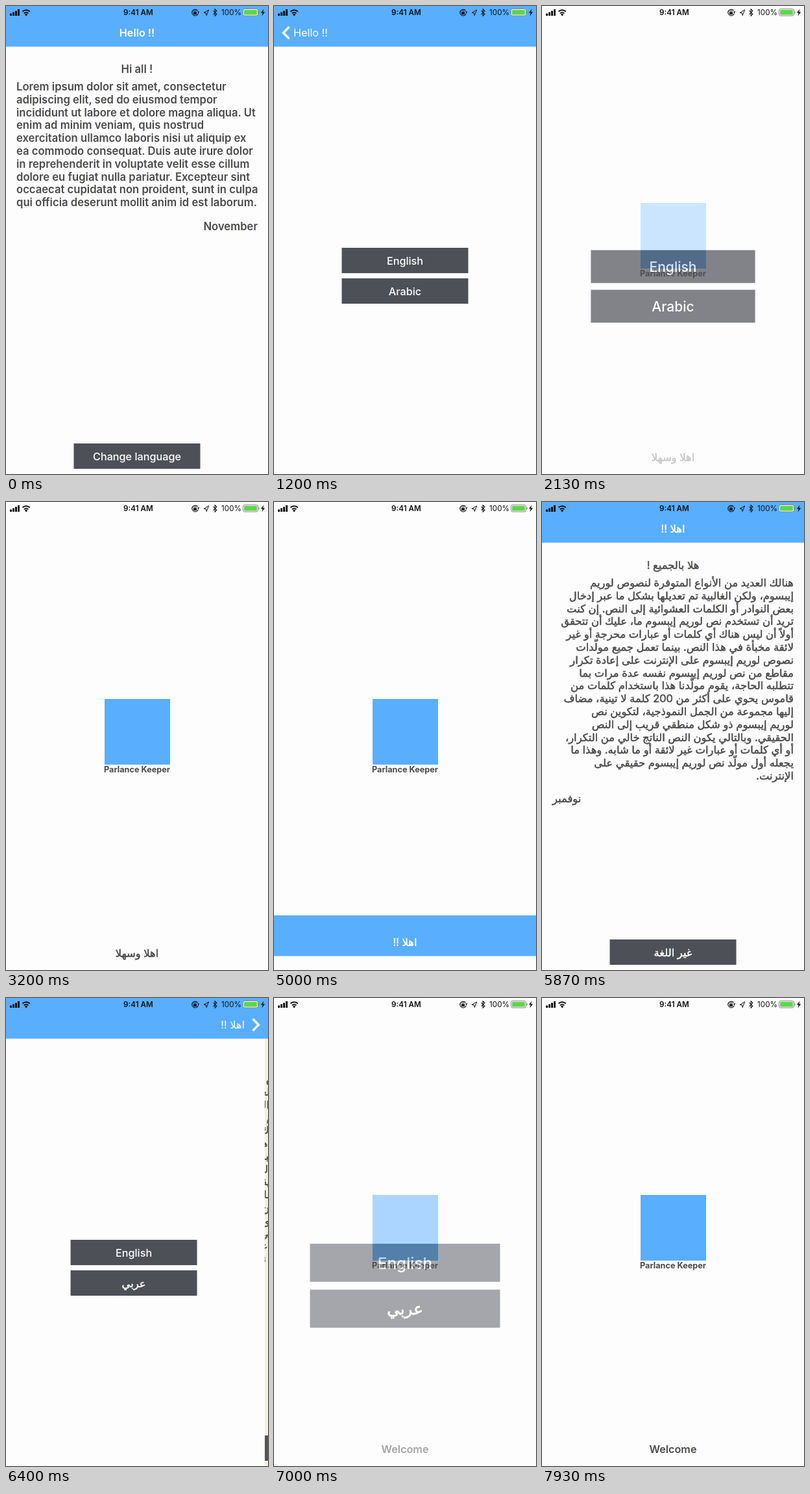
An HTML page for the animation above (8 s loop, 404 px wide and 720 px high).

```html
<!DOCTYPE html>
<html lang="en">
<head>
<meta charset="utf-8">
<title>Language switch</title>
<style>
  html, body { margin: 0; width: 100%; height: 100%; overflow: hidden; background: #fdfdfe; }
  svg { display: block; width: 100vw; height: 100vh; }
  text { font-family: Inter, "DejaVu Sans", sans-serif; font-size: 16.2px; font-weight: 600; fill: #4a4a48; }
  text.page { font-size: 16.65px; }
  text.light { fill: #fff; }
  text.medium { font-weight: 500; }
  text.regular { font-weight: 400; }
  text.caption { font-size: 12.7px; font-weight: 700; }
  /* Arabic has no semibold face: thicken the regular one */
  text.rtl { direction: rtl; font-size: 16.4px; font-weight: 400; stroke: #4a4a48; stroke-width: .5px; }
  text.light.rtl { stroke: #fff; }
  text.regular.rtl { stroke: none; }
  #status text { font-size: 11.7px; fill: #111; }
</style>
</head>
<body>
<svg id="stage" viewBox="0 0 404 720">
  <g id="scene"></g>
  <g id="status" fill="#111">
    <path d="M6 11.5h3v3.5h-3z M10 9.5h3v5.5h-3z M14 7.5h3v7.5h-3z M18 5h3v10h-3z"/>
    <g fill="none" stroke="#111" stroke-width="2">
      <path d="M25.4 8.6a8.2 8.2 0 0 1 11.4 0 M27.8 11.2a4.8 4.8 0 0 1 6.6 0"/>
      <path d="M295.5 7.2a4.8 4.8 0 1 0 .8 4.2" stroke-width="1.2"/>
      <path d="M290 9.5v-1a1.5 1.5 0 0 1 3 0v1" stroke-width="1"/>
      <path d="M319.6 7.2l5.4 5.2-2.8 2.8v-10.4l2.8 2.8-5.4 5.2" stroke-width="1.1"/>
    </g>
    <path d="M28.9 13l2.2 2.4 2.2-2.4a3 3 0 0 0-4.4 0z M289 9.3h5v3.6h-5z M294.8 8.6h3.6l-1.8 2.6z"/>
    <path d="M305 10.4l7.6-4.4-3.4 8.6-.8-3.8z" fill="none" stroke="#111"/>
    <text x="204" y="14.3" text-anchor="middle">9:41 AM</text>
    <text x="332" y="14.3" class="regular">100%</text>
    <rect x="365.5" y="4.5" width="23" height="10.5" rx="2.5" fill="#fdfdfe" stroke="#888"/>
    <rect x="367" y="6" width="20" height="7.5" rx="1.2" fill="#62d34c"/>
    <path d="M389.5 8v3.6q1.6-.6 1.6-1.8t-1.6-1.8z" fill="#888"/>
    <path d="M397.6 4.6l-4.6 6h2.8l-1.4 4.8 4.8-6.2h-2.9z"/>
  </g>
</svg>
<script>
const W = 404, H = 720, LOOP = 8000;
const BLUE = '#59aefe', PAPER = '#fdfdfe', SLATE = '#4e5058';

// Moments at which each transition begins, in ms
const PUSH_EN = 400, ZOOM_EN = 1950, PRESENT_AR = 4969, PUSH_AR = 6050, ZOOM_AR = 6750;
const ZOOM_TIME = 500;

const words = {
  en: {
    title: 'Hello !!', greeting: 'Hi all !', month: 'November', monthY: 345,
    change: 'Change language', other: 'Arabic', welcome: 'Welcome',
    body: [
      'Lorem ipsum dolor sit amet, consectetur',
      'adipiscing elit, sed do eiusmod tempor',
      'incididunt ut labore et dolore magna aliqua. Ut',
      'enim ad minim veniam, quis nostrud',
      'exercitation ullamco laboris nisi ut aliquip ex',
      'ea commodo consequat. Duis aute irure dolor',
      'in reprehenderit in voluptate velit esse cillum',
      'dolore eu fugiat nulla pariatur. Excepteur sint',
      'occaecat cupidatat non proident, sunt in culpa',
      'qui officia deserunt mollit anim id est laborum.'
    ]
  },
  ar: {
    title: 'اهلا !!', greeting: 'هلا بالجميع !', month: 'نوفمبر', monthY: 462,
    change: 'غير اللغة', other: 'عربي', welcome: 'اهلا وسهلا',
    body: [
      'هنالك العديد من الأنواع المتوفرة لنصوص لوريم',
      'إيبسوم، ولكن الغالبية تم تعديلها بشكل ما عبر إدخال',
      'بعض النوادر أو الكلمات العشوائية إلى النص. إن كنت',
      'تريد أن تستخدم نص لوريم إيبسوم ما، عليك أن تتحقق',
      'أولاً أن ليس هناك أي كلمات أو عبارات محرجة أو غير',
      'لائقة مخبأة في هذا النص. بينما تعمل جميع مولّدات',
      'نصوص لوريم إيبسوم على الإنترنت على إعادة تكرار',
      'مقاطع من نص لوريم إيبسوم نفسه عدة مرات بما',
      'تتطلبه الحاجة، يقوم مولّدنا هذا باستخدام كلمات من',
      'قاموس يحوي على أكثر من 200 كلمة لا تينية، مضاف',
      'إليها مجموعة من الجمل النموذجية، لتكوين نص',
      'لوريم إيبسوم ذو شكل منطقي قريب إلى النص',
      'الحقيقي. وبالتالي يكون النص الناتج خالي من التكرار،',
      'أو أي كلمات أو عبارات غير لائقة أو ما شابه. وهذا ما',
      'يجعله أول مولّد نص لوريم إيبسوم حقيقي على',
      'الإنترنت.'
    ]
  }
};

function add(parent, tag, attrs = {}, content) {
  const node = document.createElementNS('http://www.w3.org/2000/svg', tag);
  for (const key in attrs) node.setAttribute(key, attrs[key]);
  if (content) node.textContent = content;
  return parent.appendChild(node);
}
const set = (node, key, value) => node.setAttribute(key, value);
const move = (node, x, y = 0) => set(node, 'transform', `translate(${x} ${y})`);
const show = (node, on) => set(node, 'display', on ? 'inline' : 'none');

function label(parent, text, x, y, style = '', anchor = 'middle') {
  const rtl = /[\u0600-\u06ff]/.test(text) ? ' rtl' : '';
  return add(parent, 'text', { x, y, class: style + rtl, 'text-anchor': anchor }, text);
}
function box(parent, x, y, width, height, fill) {
  return add(parent, 'rect', { x, y, width, height, fill });
}
function button(parent, text, y) {
  box(parent, 104.5, y, 195, 39, SLATE);
  label(parent, text, 202, y + 25.7, 'light medium');
}

function buildSplash(lang) {
  const root = add(scene, 'g');
  box(root, 0, 0, W, H, PAPER);
  box(root, 152, 303, 101, 101, BLUE);
  label(root, 'Parlance Keeper', 202, 416, 'caption');
  label(root, words[lang].welcome, 202, 700);
  return root;
}

// A navigation stack: home page, language page and the bar above them
function buildNav(lang) {
  const w = words[lang], dir = lang === 'en' ? 1 : -1;
  const root = add(scene, 'g');
  const home = add(root, 'g');
  box(home, 0, 0, W, H, PAPER);
  label(home, w.greeting, 202, 102.5, 'page');
  w.body.forEach((line, i) => label(home, line, dir > 0 ? 16 : 388, 130 + i * 19.8, 'page', 'start'));
  label(home, w.month, dir > 0 ? 388 : 16, w.monthY, 'page', 'end');
  button(home, w.change, 673);
  const dim = box(home, 0, 0, W, H, '#8a7000');

  const picker = add(root, 'g');
  box(picker, 0, 0, W, H, PAPER);
  button(picker, 'English', 372);
  button(picker, w.other, 419);

  box(root, 0, 0, W, 62.6, BLUE);
  const title = label(root, w.title, 202, 47, 'light');
  const back = label(root, w.title, dir > 0 ? 30 : 370, 47, 'light regular', 'start');
  const chevron = add(root, 'path', {
    d: dir > 0 ? 'M23.5 32l-9 9.2 9 9.2' : 'M380.5 32l9 9.2-9 9.2',
    fill: 'none', stroke: '#fff', 'stroke-width': 3.4
  });
  return { root, home, dim, picker, title, back, chevron, dir };
}

const scene = document.getElementById('scene');
const splash = { en: buildSplash('en'), ar: buildSplash('ar') };
const nav = { en: buildNav('en'), ar: buildNav('ar') };

// Critically damped spring used by pushes and modals
function spring(ms) {
  if (ms <= 0) return 0;
  if (ms > 520) return 1;
  const x = ms * 0.01826;
  return 1 - (1 + x) * Math.exp(-x);
}
function ease(u) {
  u = Math.min(1, Math.max(0, u));
  return u * u * (3 - 2 * u);
}

function push(n, p) {
  move(n.home, -n.dir * W * 0.3 * p);
  move(n.picker, n.dir * W * (1 - p));
  set(n.dim, 'opacity', 0.1 * p);
  move(n.title, -n.dir * 147 * p);
  move(n.back, n.dir * 147 * (1 - p));
  set(n.title, 'opacity', 1 - p);
  set(n.back, 'opacity', p);
  set(n.chevron, 'opacity', p);
}

// Leaving a stack: it swells to double size while fading out
function zoom(n, u, y) {
  const e = ease(u), s = 1 + e;
  show(n.root, e < 1);
  set(n.root, 'opacity', 1 - e);
  set(n.root, 'transform', `translate(202 ${360 + y}) scale(${s}) translate(-202 -360)`);
}

function render(t) {
  show(splash.ar, t >= ZOOM_EN && t < ZOOM_AR);
  show(splash.en, t >= ZOOM_AR);
  push(nav.en, spring(t - PUSH_EN));
  zoom(nav.en, (t - ZOOM_EN) / ZOOM_TIME, 0);
  push(nav.ar, spring(t - PUSH_AR));
  zoom(nav.ar, (t - ZOOM_AR) / ZOOM_TIME, H * (1 - spring(t - PRESENT_AR)));
  if (t < PRESENT_AR) show(nav.ar.root, false);
}

const start = performance.now();
function tick() {
  render((performance.now() - start) % LOOP);
  requestAnimationFrame(tick);
}
render(0);
requestAnimationFrame(tick);
</script>
</body>
</html>
```
